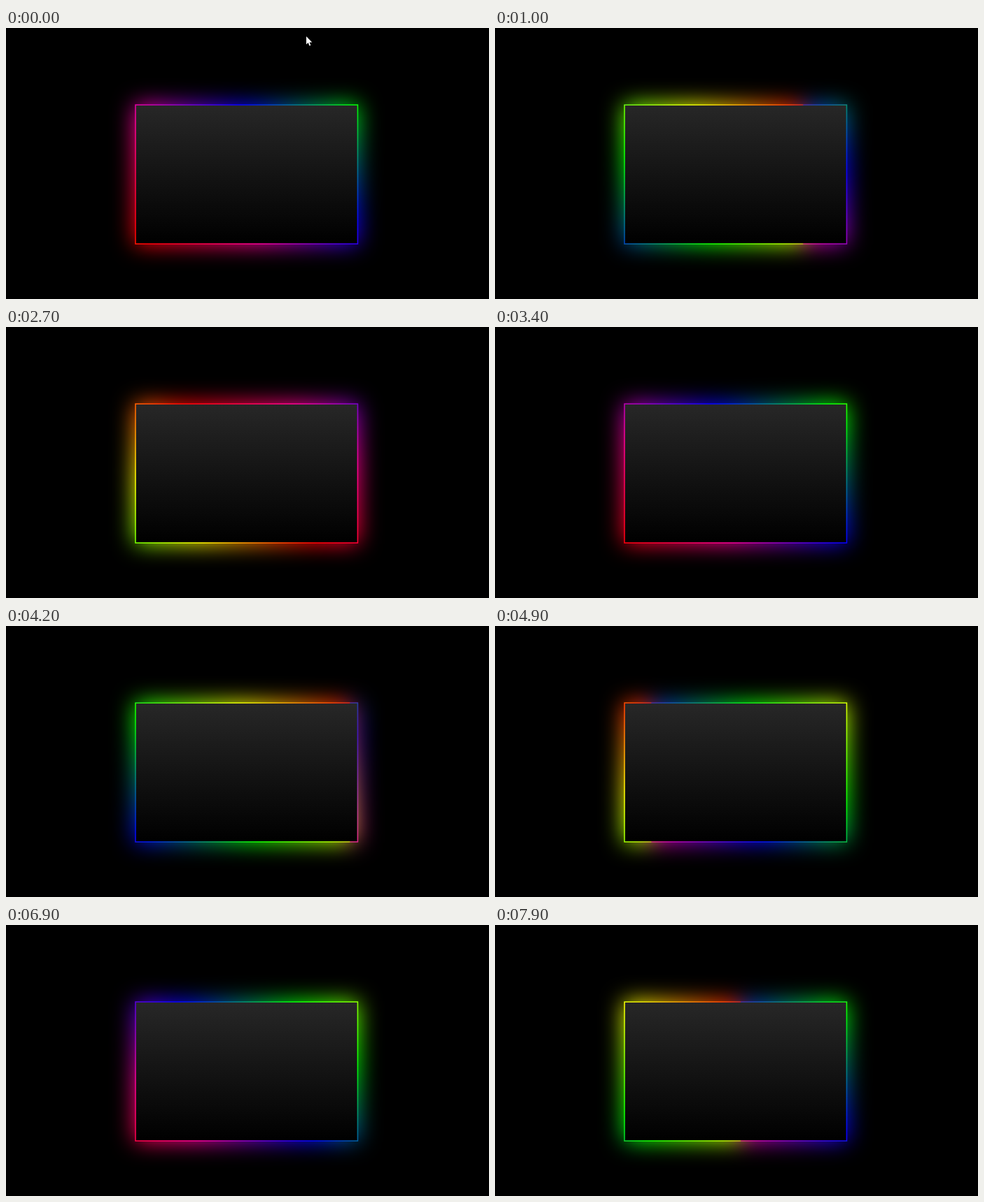
These frames come from a looping animation (690 px wide and 388 px high, 8 s). An HTML page:

```html
<!DOCTYPE html>
<html lang="en">
<head>
<meta charset="utf-8">
<title>Glowing border</title>
<style>
  html, body {
    margin: 0;
    width: 100%;
    height: 100%;
    overflow: hidden;
    background: #000;
  }

  .stage {
    position: absolute;
    left: 0;
    top: 0;
    width: 690px;
    height: 388px;
    overflow: hidden;
    background: #000;
  }

  .box {
    position: absolute;
    left: 0;
    top: 0;
    width: 404px;
    height: 254px;
    transform-origin: 0 0;
    transform: translate(184.2px, 109.3px) scale(.7896);
  }

  .edge, .glow, .panel {
    position: absolute;
    inset: 0;
  }

  .edge, .glow {
    background: linear-gradient(45deg,
      #fb0094, #00f, #0f0, #ff0, #f00,
      #fb0094, #00f, #0f0, #ff0, #f00);
    background-size: 400% 100%;
    animation: slide 8s steps(80) infinite;
  }

  .glow { filter: blur(20px); }

  .panel {
    inset: 2px;
    background: linear-gradient(0deg, #000, #272727);
  }

  .cursor {
    position: absolute;
    left: 0;
    top: 0;
    width: 12px;
    height: 18px;
    overflow: visible;
    animation: leave 8s step-end infinite;
  }

  /* 1.2 box widths per second */
  @keyframes slide {
    from { background-position: -807px 0; }
    to { background-position: -4685.4px 0; }
  }

  @keyframes leave {
    0% { transform: translate(429px, 12px); }
    2.5% { transform: translate(434px, 12px); }
    3.75% { transform: translate(470px, 9px); }
    5% { transform: translate(537px, 4px); }
    6.25% { transform: translate(570px, 1px); }
    7.5% { transform: translate(587px, -6px); }
    8.75%, 100% { transform: translate(600px, -30px); }
  }
</style>
</head>
<body>
<div class="stage">
  <div class="box">
    <div class="edge"></div>
    <div class="glow"></div>
    <div class="panel"></div>
  </div>
  <svg class="cursor" viewBox="0 0 12 18">
    <path d="M0 0V11.6L2.7 9.1L4.5 13.6L6.3 12.8L4.5 8.5H8.3Z" fill="#fff"/>
  </svg>
</div>
</body>
</html>
```
